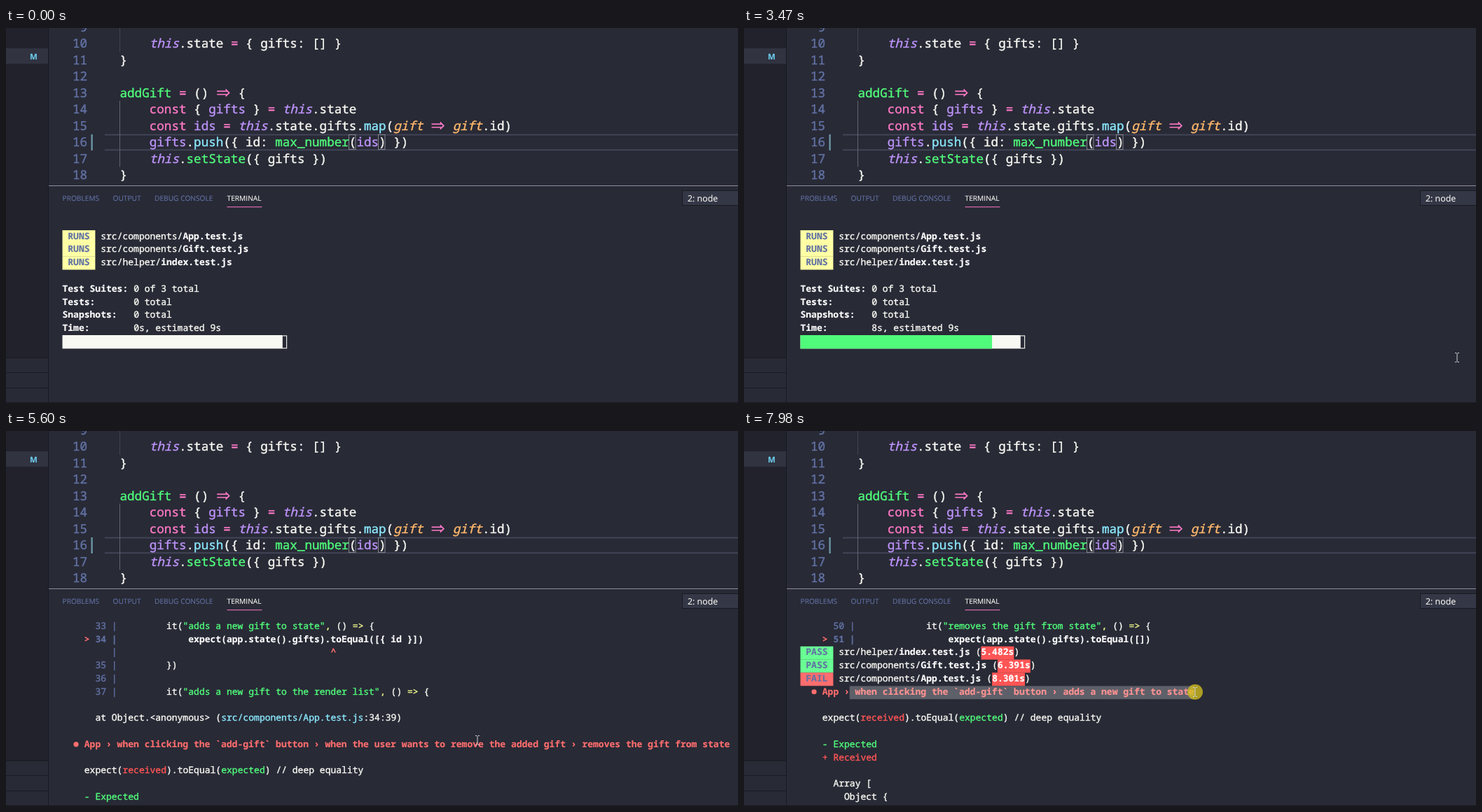
These frames come from a looping animation (1045x536 px, 8 s). An HTML page:

```html
<!DOCTYPE html>
<html lang="en">
<head>
<meta charset="utf-8">
<title>Test run in the terminal</title>
<style>
  html, body { margin: 0; width: 100%; height: 100%; overflow: hidden; background: #282a36; }
  svg { display: block; width: 1045px; height: 536px; }
  text { white-space: pre; text-rendering: geometricPrecision; stroke-width: .4px; }
  .code { font: 17.6px "Noto Sans Mono", "DejaVu Sans Mono", monospace; }
  .term { font: 500 13.03px "Noto Sans Mono", "DejaVu Sans Mono", monospace; }
  .ui { font: 10.2px "Open Sans", "Noto Sans", sans-serif; stroke-width: .12px; }
  .bold { font-weight: 700; stroke-width: .15px; }
  .italic { font-style: italic; }
</style>
</head>
<body>
<svg viewBox="0 0 1045 536" xmlns="http://www.w3.org/2000/svg">
  <g id="frame"></g>
  <g id="editor"></g>
  <g id="terminal"></g>
  <rect id="selection" x="150.7" y="364.5" height="18.8" fill="#fff" fill-opacity=".25"/>
  <g id="mouse">
    <circle id="halo" r="11" fill="#d8c41c" fill-opacity=".75"/>
    <path d="M-3-6.5H-1L0-5.5 1-6.5H3M0-5.5V5.5M-3 6.5H-1L0 5.5 1 6.5H3" fill="none" stroke="#d0d0d0"/>
  </g>
</svg>
<script>
const LOOP = 8000;
const $ = id => document.getElementById(id);
const esc = s => s.replace(/&/g, "&amp;").replace(/</g, "&lt;");
const rect = (x, y, w, h, fill, more = "") =>
  `<rect x="${x}" y="${y}" width="${w}" height="${h}" fill="${fill}" ${more}/>`;
const label = (x, y, s, fill, cls, more = "") =>
  `<text x="${x}" y="${y}" fill="${fill}" stroke="${fill}" class="${cls}" ${more}>${esc(s)}</text>`;

// Style codes follow a § sign: [fill, class, badge colour]
const STYLES = {
  w: ["#f8f8f2"], W: ["#fff", "bold"],
  g: ["#50fa7b"], G: ["#69ff94", "bold"],
  r: ["#ff5555"], R: ["#ff6e6e", "bold"],
  b: ["#6272a4"], B: ["#6272a4", "bold"],
  y: ["#f1fa8c"], Y: ["#ffffa5", "bold"],
  c: ["#8be9fd"], k: ["#ff79c6"], p: ["#bd93f9"],
  t: ["#bd93f9", "italic"], o: ["#ffb86c", "italic"],
  U: ["#6272a4", "bold", "#ffffa5"],
  P: ["#6272a4", "bold", "#69ff94"],
  F: ["#6272a4", "bold", "#ff6e6e"],
  T: ["#fff", "bold", "#ff5555"]
};

function styled(line, x0, base, cw, font) {
  let col = 0, out = "";
  for (const run of line.split("§").slice(1)) {
    const [fill, cls = "", badge] = STYLES[run[0]], s = run.slice(1);
    const x = x0 + col * cw, lead = s.search(/\S|$/);
    if (badge) out += rect(x, base - 12.6, s.length * cw, 18.9, badge);
    if (s.trim() === "●") out += `<circle cx="${x + (lead + .5) * cw}" cy="${base - 4}" r="3.6" fill="${fill}"/>`;
    else if (s.trim() === "⇒") out += arrow(x + lead * cw, base - 5.8);
    else out += label(x + lead * cw, base, s.trim(), fill, `${font} ${cls}`);
    col += s.length + (s.includes("⇒") ? 1 : 0);
  }
  return out;
}

const arrow = (x, y) => `<path transform="translate(${x} ${y})" fill="none" stroke="#ff79c6" stroke-width="1.7"
  d="M1.5-2.3H16.5M1.5 2.3H16.5M13.8-5 18.8 0 13.8 5"/>`;

// Window furniture
const DARK = "#191a21", MUTED = "#6272a4";
$("frame").innerHTML =
  rect(0, 0, 1045, 536, "#282a36") + rect(0, 0, 60, 471, "#21222c") +
  rect(0, 29, 60, 22, "#313341") + rect(60, 0, 1, 536, DARK) +
  [471, 492, 514].map(y => rect(0, y, 60, 1, DARK)).join("") +
  label(34, 44.5, "M", "#6cc9e8", "ui bold", 'style="font-size:11.5px"') +
  rect(61, 225, 984, 1, "#908c9f") + rect(0, 535, 1045, 1, DARK) +
  [[80.5, "PROBLEMS"], [152.5, "OUTPUT"], [212, "DEBUG CONSOLE"], [315.5, "TERMINAL"]]
    .map(([x, s], i) => label(x, 247, s, i === 3 ? "#f8f8f2" : MUTED, "ui")).join("") +
  rect(315.5, 255.3, 50, 1, "#ff79c6") +
  rect(965.5, 232.5, 90, 21, "#343746", `stroke="${DARK}"`) +
  label(973, 248.3, "2: node", "#f8f8f2", "ui", 'style="font-size:12.4px"');

// Editor, lines 9 to 18
const CODE = [
  "",
  "§t    this§w.state§k =§w { gifts: [] }",
  "§w}",
  "",
  "§gaddGift§k =§w ()§k ⇒§w {",
  "§k    const§w {§p gifts§w }§k =§t this§w.state",
  "§k    const§p ids§k =§t this§w.state.gifts.§cmap§w(§ogift§k ⇒§o gift§w.id)",
  "§p    gifts§w.§cpush§w({ id:§g max_number§w(§pids§w) })",
  "§t    this§w.§gsetState§w({ gifts })",
  "§w}"
];
const bracket = x => rect(x, 152.5, 9.5, 21, "none", 'stroke="#85868c"');
$("editor").innerHTML =
  rect(141, 151.7, 904, 1.8, "#44475a") + rect(141, 173.4, 904, 1.8, "#44475a") +
  rect(162, 0, 1, 34, "#41434f") + rect(162, 104, 1, 94.5, "#62646e") +
  rect(121.5, 152, 2.2, 23, "#6f9dab") + bracket(489.5) + bracket(531.5) +
  CODE.map((s, i) => {
    const base = 4.5 + 23.5 * i;
    return label(116, base, String(9 + i), MUTED, "code", 'text-anchor="end"') +
      styled(s, 162.5, base, 10.56, "code");
  }).join("");

// Terminal
const X0 = 80.5, CW = 7.818, Y0 = 270.2, RH = 18.77;
const cursor = (row, col) =>
  rect(X0 + col * CW + 1, Y0 + row * RH + .8, CW - 1.4, RH - 1, "none", 'stroke="#f8f8f2" stroke-width="1.1"');
const print = lines => lines.map((s, i) => styled(s, X0, Y0 + i * RH + 12.7, CW, "term")).join("");

const FILES = { app: "components/§WApp", gift: "components/§WGift", help: "helper/§Windex" };
const runs = f => `§U RUNS §w src/${FILES[f]}.test.js`;
const done = (f, secs, tag = "P PASS ") => `§${tag}§w src/${FILES[f]}.test.js§w (§T${secs}§w)`;
const summary = (suites, tests, snaps, time) =>
  [["Test Suites:", suites], ["Tests:", tests], ["Snapshots:", snaps], ["Time:", time]]
    .map(([k, v]) => `§W${k.padEnd(13)}${v}`);

const waiting = sec => print(["", runs("app"), runs("gift"), runs("help"), "",
    ...summary("§w0 of 3 total", "§w0 total", "§w0 total", `§w${sec}s, estimated 9s`)]) +
  rect(X0, 439, 40 * CW + 1, 19.3, "#f8f8f2") +
  rect(X0, 439, Math.floor(40 * sec / 9) * CW, 19.3, "#50fa7b") + cursor(9, 40);

const onePassed = time => print([done("help", "5.482s"), "", runs("app"), runs("gift"), "",
    ...summary("§G1 passed§w, 1 of 3 total", "§G2 passed§w, 2 total", "§w0 total", time)]) +
  cursor(8, 11 + time.length);

const twoPassed = () => print([done("help", "5.482s"), done("gift", "6.391s"), "", runs("app"), "",
    ...summary("§G2 passed§w, 2 of 3 total", "§G7 passed§w, 7 total", "§G1 passed§w, 1 total", "§Y11s")]) +
  cursor(8, 16);

const src = (n, s = "") => `§b      ${n} |§w${s}`;
const it = (pad, name) => `${" ".repeat(pad)}it(§g"${name}"§y,§w ()§y =>§w {`;
const hit = (n, pad, s) => `§R    >§B ${n} |§W${" ".repeat(pad)}expect(app.state().gifts).toEqual(${s})`;
const caret = col => `§b         |§R${" ".repeat(col - 10)}^`;
const at = pos => `§w      at Object.<anonymous> (§csrc/components/App.test.js§w:${pos})`;
const fail = s => "§R  ●§R App › when clicking the `add-gift` button › " + s;
const diff = ["", "§w    expect(§rreceived§w).toEqual(§gexpected§w) // deep equality", "",
  "§g    - Expected", "§r    + Received", ""];

const LOG = [
  src(50, it(13, "removes the gift from state")), hit(51, 17, "[]"),
  done("help", "5.482s"), done("gift", "6.391s"), done("app", "8.301s", "F FAIL "),
  fail("adds a new gift to state"), ...diff,
  "§w      Array [", "§w        Object {", '§g    -     "id": 1,', '§r    +     "id": -Infinity,',
  "§w        },", "§w      ]", "",
  src(31, "         })"), src(32), src(33, it(9, "adds a new gift to state")), hit(34, 13, "[{ id }]"), caret(49),
  src(35, "         })"), src(36), src(37, it(9, "adds a new gift to the render list")),
  "", at("34:39"), "",
  fail("when the user wants to remove the added gift › removes the gift from state"), ...diff,
  "§g    - Array []", "§r    + Array [", "§r    +   Object {", '§r    +     "id": -Infinity,',
  "§r    +   },", "§r    + ]", "",
  src(48, "             })"), src(49), src(50, it(13, "removes the gift from state")), hit(51, 17, "[]"), caret(53),
  src(52, "             })"), src(53), src(54, it(13, "removes the gift from list")),
  "", at("51:43"), "",
  ...summary("§R1 failed§w, §G2 passed§w, 3 total", "§R2 failed§w, §G8 passed§w, 10 total",
    "§G1 passed§w, 1 total", "§Y11.482s"),
  "§bRan all test suites.", "", "§WWatch Usage:§w Press w to show more."
];
const log = top => print(LOG.slice(top, top + 14));
const blank = cursor(0, 0);

const SCENES = [
  [0, waiting(0)], [250, waiting(1)], [700, waiting(2)], [1160, waiting(3)], [1610, waiting(4)],
  [2030, blank], [2070, waiting(5)], [2490, waiting(6)], [2940, waiting(7)], [3400, waiting(8)],
  [3680, blank], [3720, onePassed("§w9s")], [4170, onePassed("§Y10s")],
  [4590, blank], [4630, twoPassed()],
  [4900, log(9)], [4940, log(48)], [5360, log(44)], [5390, log(41)],
  [5600, log(21)], [5640, log(15)], [5670, log(9)], [5850, log(0)]
];

// Pointer path: [time, x, y]
const PATH = [
  [3400, 1019, 365], [3435, 1019, 514], [3470, 1018, 471], [3680, 1018, 471], [3850, 1005, 284],
  [4060, 1004, 285], [4400, 850, 385], [4730, 673, 442], [6060, 673, 442], [6380, 400, 395],
  [6690, 157, 373], [6830, 153, 371], [7180, 334, 377], [7400, 445, 381], [7630, 544, 376],
  [7670, 548, 377], [7760, 580, 383], [7880, 622, 376], [7980, 644, 373]
];

function pointer(t) {
  const i = PATH.findLastIndex(k => k[0] <= t);
  if (i < 0) return null;
  const [t0, x0, y0] = PATH[i], [t1, x1, y1] = PATH[i + 1] || PATH[i];
  const steps = Math.max(1, Math.round((t1 - t0) / 37));
  const u = t1 > t0 ? Math.floor((t - t0) / (t1 - t0) * steps) / steps : 0;
  return [x0 + (x1 - x0) * u, y0 + (y1 - y0) * u];
}

const show = (el, on) => el.setAttribute("visibility", on ? "visible" : "hidden");
const start = performance.now();
let current = -1;

function draw() {
  const t = (performance.now() - start) % LOOP;
  const scene = SCENES.findLastIndex(s => s[0] <= t);
  if (scene !== current) $("terminal").innerHTML = SCENES[current = scene][1];

  const p = pointer(t), dragging = t >= 6830;
  show($("mouse"), p);
  show($("halo"), dragging);
  show($("selection"), dragging);
  if (p) {
    $("mouse").setAttribute("transform", `translate(${p[0]} ${p[1]})`);
    const cols = Math.floor((p[0] - X0) / CW) - 9;
    $("selection").setAttribute("width", Math.max(0, cols) * CW);
  }
  requestAnimationFrame(draw);
}
draw();
</script>
</body>
</html>
```
